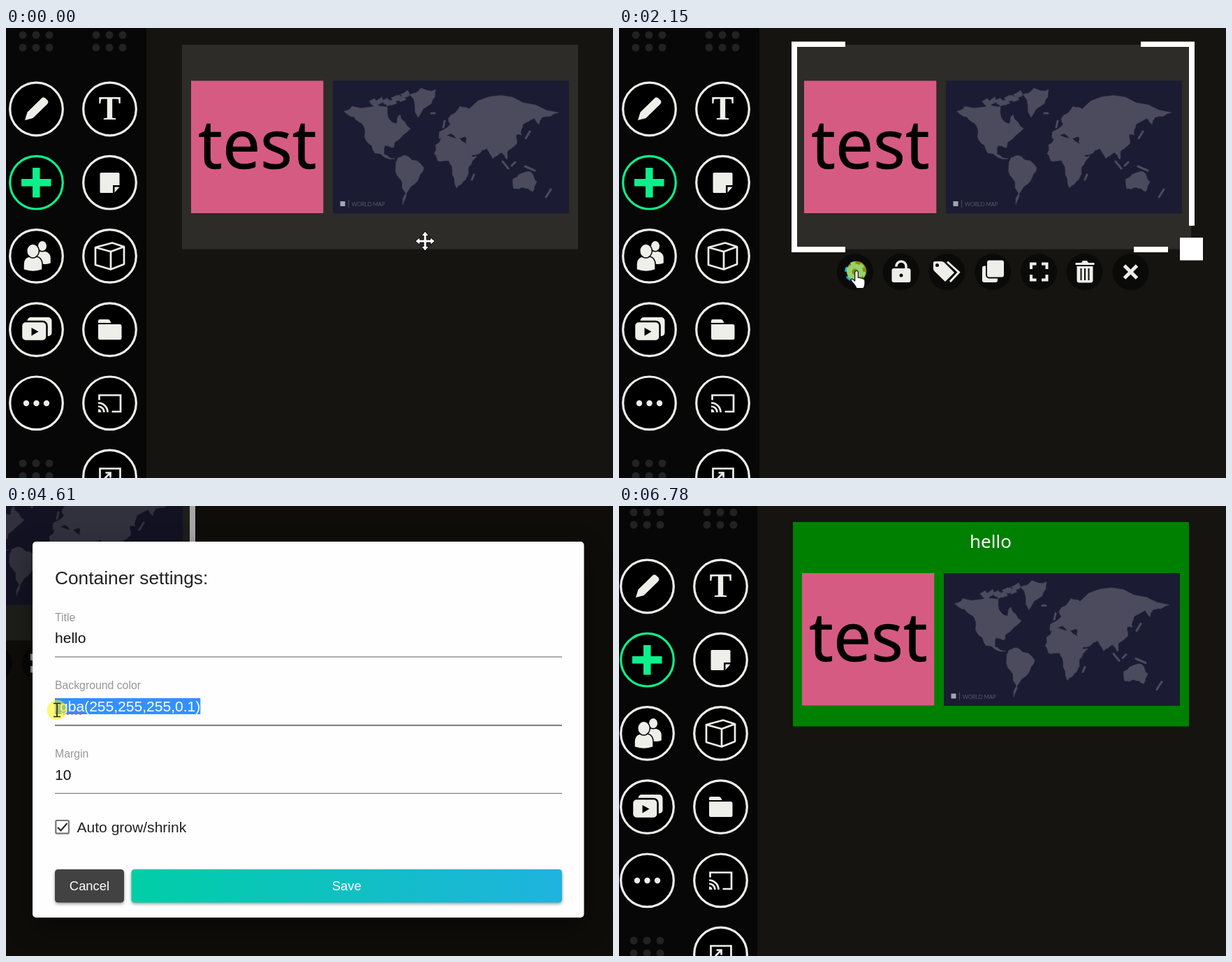
These frames come from a looping animation (869x644 px, 7.9 s). An HTML page:

```html
<!DOCTYPE html>
<html lang="en">
<head>
<meta charset="utf-8">
<title>Container settings</title>
<style>
  html, body { margin: 0; width: 100%; height: 100%; overflow: hidden; background: #151410; }
  svg { display: block; width: 100%; height: 100%; }
  .ring { fill: #000; stroke: #efefea; stroke-width: 3.2; }
  .ring.on { stroke: #0cf08b; }
  .dot { fill: #222; }
  .line { fill: none; stroke: #efefea; stroke-width: 2.7; }
  #icons { fill: #efefea; }
  #tools g { color: #efefea; fill: currentColor; }
  #tools g.hot { color: #10aef2; }
  #tools .disc, #tools .hole { fill: #0a0a09; }
  #tools .stroke { fill: none; stroke: currentColor; }
  #map { fill: #4b4b5d; stroke: #4b4b5d; stroke-linejoin: round; stroke-linecap: round; }
  #dialog text { font-family: "Liberation Sans", Arial, sans-serif; }
  .paper { fill: #fefefe; filter: drop-shadow(0 14px 18px rgba(0,0,0,.4)); }
  .field { font-size: 21.05px; fill: #111; }
  .label { font-size: 15.8px; fill: #979797; }
  .rule { fill: #838383; }
  .button { filter: drop-shadow(0 2px 2px rgba(0,0,0,.4)); }
  .caption { font-size: 18.42px; fill: #fff; text-anchor: middle; }
  #hint rect { fill: #292a2d; filter: drop-shadow(0 2px 3px rgba(0,0,0,.4)); }
  #dialog #hint text { font: 600 14.6px "Open Sans", sans-serif; fill: #f1f1f1; }
  #caret { fill: #777; }
</style>
</head>
<body>
<svg viewBox="0 0 869 644" preserveAspectRatio="none">
  <defs>
    <linearGradient id="teal">
      <stop offset="0" stop-color="#00cea6"/>
      <stop offset="1" stop-color="#1fb3df"/>
    </linearGradient>
  </defs>
  <rect width="869" height="644" fill="#151410"/>

  <g id="world">
    <rect x="-10" y="-10" width="211" height="670" fill="#070707"/>
    <g id="side"></g>
    <g id="icons">
      <path d="M27 132 30.5 120.5 51 100.5Q54 98 57 101L59.5 103.5Q61.5 106 59 109L38.5 129Z"/>
      <text x="148.500" y="131" text-anchor="middle" font-family="Liberation Serif, Times, serif" font-weight="700" font-size="48">T</text>
      <path stroke="#0cf08b" stroke-width="10.5" d="M43.300 200V242.500M22 221.300H64.500"/>
      <path d="M136 207H161Q162.500 207 162.500 208.500V225H153V236H136Q134.500 236 134.500 234.500V208.500Q134.500 207 136 207ZM155.500 235.500V227.500H162.500Z"/>
      <g stroke="#000" stroke-width="1.5">
        <path d="M42 338V328Q42 320 49 319H56Q64.500 321 64.500 329V337Q58 340 50 338Z"/>
        <ellipse cx="52" cy="312" rx="6.800" ry="7.800"/>
        <path d="M25 346V338Q25 329 33 327H44Q52 329 52 338V346Q39 351 25 346Z"/>
        <ellipse cx="38.500" cy="319" rx="8.800" ry="10"/>
      </g>
      <path class="line" stroke-linejoin="round" d="M128 314 152 307.500 169 313V338L150 345.500 128 339ZM128 314 150 320 169 313M150 320V345"/>
      <rect x="30.500" y="414" width="35" height="27" rx="5"/>
      <rect x="22" y="420" width="36.500" height="28" rx="6" stroke="#000" stroke-width="2.5"/>
      <path fill="#000" d="M36.500 429 46.500 434.500 36.500 440.500Z"/>
      <path d="M132 422V419Q132 417 134 417H146Q148 417 149 419L150.500 422ZM132 424H163Q165.500 424 165.500 426.500V443.500Q165.500 446 163 446H134.500Q132 446 132 443.500Z"/>
      <path class="line" d="M133.500 532.500V525.500H164V549H151.500M132 536.500A13.500 13.500 0 0 1 145.500 550M132 541.500A8.500 8.500 0 0 1 140.500 550"/>
      <path d="M132 545.500A4.500 4.500 0 0 1 136.500 550H132Z"/>
      <path class="line" d="M134.500 655V630.500H163.500V655M141 645 149 637M142.500 636.500H149.500V643.500"/>
    </g>

    <rect id="box" x="252" y="24" width="567" height="292.500"/>
    <text id="heading" x="535" y="61" text-anchor="middle" font-family="Noto Sans, sans-serif" font-size="26" fill="#fff"></text>
    <g id="items">
      <rect x="265" y="75.500" width="189.300" height="189.500" fill="#d65b83"/>
      <text x="360" y="201" text-anchor="middle" font-family="Noto Sans, Open Sans, sans-serif" font-size="96" stroke="#000" stroke-width=".6">test</text>
      <rect x="468" y="75.500" width="338" height="190" fill="#1b1c34"/>
      <g id="map">
        <path id="land" stroke-width=".5"/>
        <path id="islands" stroke-width="3" d="M626 142 628 133M744 158 750 148M667 217 670 210M711 191 719 201M724 197 729 192M743 198 757 204M773 242 780 231M609 122H614"/>
      </g>
      <rect x="478.500" y="248" width="7" height="7" fill="#a5a5b0"/>
      <path d="M490.500 246V257" stroke="#4b4b5d"/>
      <text x="495" y="255" font-family="Lato, sans-serif" font-weight="300" font-size="7.800" fill="#85858f">WORLD MAP</text>
    </g>

    <g id="picked">
      <path fill="#fff" d="M247 19.500H324V27H255V313H324V321H247ZM747 19.500H824V283H816V27H747ZM737 313H786V321H737ZM803 300H836V332.500H803Z"/>
      <g id="tools">
        <g id="gear">
          <circle class="stroke" cx="338" cy="349" r="8" stroke-width="7"/>
          <circle class="stroke" cx="338" cy="349" r="12.500" stroke-width="5" stroke-dasharray="6.545"/>
        </g>
        <g id="lock">
          <rect x="390.500" y="344" width="27" height="20" rx="3"/>
          <path class="stroke" stroke-width="3.5" d="M397 341.500V341A7 7 0 0 1 411 341V345"/>
          <circle class="hole" cx="404" cy="354" r="2.500"/>
        </g>
        <g id="tag">
          <path d="M452 334H462Q464 334 465.500 335.500L480 350 467 363 451.500 348Q450 346.500 450 344.500V336Q450 334 452 334Z"/>
          <circle class="hole" cx="455.500" cy="339.500" r="2.500"/>
          <path class="stroke" stroke-width="3" d="M470 334.500 486.500 349.500 474 363"/>
        </g>
        <g id="copy">
          <rect x="520" y="340.500" width="22" height="23.500" rx="3"/>
          <rect x="526" y="331.500" width="26" height="26" rx="4" stroke="#0a0a09" stroke-width="2"/>
        </g>
        <g id="full">
          <path class="stroke" stroke-width="4" d="M590 345V337.500H597.500M605 337.500H612.500V345M612.500 353V360.500H605M597.500 360.500H590V353"/>
        </g>
        <g id="bin">
          <path d="M653.500 336H662L664 333H670L672 336H680.500V339H653.500ZM655.500 341H678.500V361Q678.500 364.500 675 364.500H659Q655.500 364.500 655.500 361Z"/>
          <path stroke="#0a0a09" stroke-width="2" d="M661.500 344V361M667 344V361M672.500 344V361"/>
        </g>
        <g id="close">
          <path class="stroke" stroke-width="5" d="M723.500 340 741.500 358M741.500 340 723.500 358"/>
        </g>
      </g>
    </g>
  </g>

  <g id="dialog">
    <rect width="869" height="644" opacity=".35"/>
    <rect class="paper" x="38" y="51" width="789.500" height="538" rx="5"/>
    <text x="70" y="112" font-size="26.300" fill="#222">Container settings:</text>
    <text id="titleLabel" class="label" x="70">Title</text>
    <text id="title" class="field" x="70" y="196"></text>
    <rect id="titleRule" class="rule" x="70" y="215.300" width="726"/>
    <text class="label" x="70" y="262">Background color</text>
    <rect id="marked" y="275" height="23" fill="#3390ff"/>
    <path id="squiggle" fill="none" stroke="#e0404a"/>
    <text id="color" class="field" x="70" y="293.500"></text>
    <rect id="colorRule" class="rule" x="70" y="312.800" width="726"/>
    <text class="label" x="70" y="360">Margin</text>
    <text class="field" x="70" y="391.500">10</text>
    <rect class="rule" x="70" y="410.700" width="726" height="1.300"/>
    <rect x="71.300" y="450" width="18.600" height="18.600" rx="1.500" fill="none" stroke="#757575" stroke-width="2.200"/>
    <path d="M74 460 78.500 464.500 87.500 454" fill="none" stroke="#222" stroke-width="2"/>
    <text class="field" x="101.500" y="466.500" style="fill:#222">Auto grow/shrink</text>
    <rect class="button" x="70" y="520" width="99" height="47.500" rx="4.500" fill="#424242"/>
    <text class="caption" x="119.500" y="550">Cancel</text>
    <rect class="button" x="179.500" y="520" width="616.500" height="47.500" rx="4.500" fill="url(#teal)"/>
    <text class="caption" x="487.800" y="550">Save</text>
    <rect id="caret" width="1.200" height="22"/>
    <g id="hint">
      <rect x="69" y="201" width="230" height="62" rx="5"/>
      <text x="84" y="238">hello</text>
    </g>
  </g>

  <g id="pointer">
    <circle id="halo" r="14.300" fill="#fff200" opacity=".55"/>
    <path id="move" fill="#fff" stroke="#000" d="M0-14 5.500-7.500H2V-2H7.500V-5.500L14 0 7.500 5.500V2H2V7.500H5.500L0 14-5.500 7.500H-2V2H-7.500V5.500L-14 0-7.500-5.500V-2H-2V-7.500H-5.500Z"/>
    <path id="hand" fill="#fff" stroke="#111" stroke-width="1.2" stroke-linejoin="round" d="M-2.300 2Q-2.300-.5 0-.5T2.300 2V9.500Q4.500 8.500 6 10Q8 9.500 9 11Q12 11 12 14V18Q12 21 10 24.500H0Q-1 21.500-4 18Q-7 15-8 12.500Q-7.500 10-4.500 12L-2.300 14Z"/>
    <path id="beam" fill="none" stroke="#222" stroke-width="1.7" d="M-5-9.500H-1L0-8.500 1-9.500H5M-5 9.500H-1L0 8.500 1 9.500H5M0-8.500V8.500"/>
  </g>
</svg>
<script>
const LOOP = 7900;
const $ = id => document.getElementById(id);
const show = (id, on) => { $(id).style.display = on ? '' : 'none'; };
const set = (id, attrs) => { for (const k in attrs) $(id).setAttribute(k, attrs[k]); };
const disc = (x, y, r, cls) => `<circle class="${cls}" cx="${x}" cy="${y}" r="${r}"/>`;

// Sidebar buttons, grips and the three dots
const trio = (x, y, gap, r, cls) => [-gap, 0, gap].map(d => disc(x + d, y, r, cls)).join('');
const grip = (x, y) => trio(x, y, 19, 5.5, 'dot') + trio(x, y + 18, 19, 5.5, 'dot');
let side = grip(43, 10) + grip(148, 10) + grip(43, 623);
for (let i = 0; i < 6; i++) {
  const y = 116 + 105.2 * i;
  if (i < 5) side += disc(43.5, y, 37.8, i === 1 ? 'ring on' : 'ring');
  side += disc(148.5, y, 37.8, 'ring');
}
$('side').innerHTML = side;
$('icons').insertAdjacentHTML('beforeend', trio(43.5, 537, 14.5, 4.2, ''));
[...$('tools').children].forEach((g, i) =>
  g.insertAdjacentHTML('afterbegin', disc(338 + 65.75 * i, 349, 26, 'disc')));
set('squiggle', { d: 'M78 297.5q1.5-3 3 0' + 't3 0'.repeat(10) });

// Rough coastlines: a few corners per landmass, broken up by midpoint displacement
let seed = 11;
const random = () => (seed = seed * 16807 % 2147483647) / 2147483647;
function roughen(points) {
  return points.flatMap(([x, y], i) => {
    const [u, v] = points[(i + 1) % points.length];
    const k = (random() - 0.5) * 0.3;
    return [[x, y], [(x + u) / 2 + k * (v - y), (y + v) / 2 - k * (u - x)]];
  });
}
function coast(corners) {
  const points = corners.split(' ').map(p => p.split(',').map(Number));
  return 'M' + roughen(roughen(points)).map(p => p.map(n => n.toFixed(1))).join('L') + 'Z';
}
const northAmerica = '484,119 495,112 546,113 547,128 559,137 564,124 579,144 557,163 555,171 543,168 541,181 557,187 528,179 515,160 512,140 498,127';
const southAmerica = '561,186 576,184 598,200 589,219 573,237 568,253 567,220 558,199';
const greenland = '578,95 594,86 615,88 609,108 590,128';
const africa = '623,158 637,156 658,165 667,184 674,184 662,199 658,217 645,229 639,203 634,190 618,190 613,180';
const eurasia = '620,158 620,149 636,138 633,130 650,112 663,116 725,99 791,121 767,128 763,138 756,129 740,138 738,153 731,152 731,166 719,175 717,188 710,178 697,187 688,172 677,180 667,182 659,164 659,156 645,158 638,151';
const australia = '726,216 744,206 751,206 760,220 754,234 740,228 727,230';
let land = [northAmerica, southAmerica, greenland, africa, eurasia, australia].map(coast).join('');
for (let i = 0; i < 12; i++) {
  const x = 520 + 4.5 * i, y = 108 - i + 8 * (random() - 0.5), w = 4 + 5 * random();
  land += `M${x} ${y}l${w}-4 ${w / 2} 6-${w} 3Z`;
}
set('land', { d: land });

// Each step keeps what the ones before it set
const steps = [
  [0, { view: 'board', picked: 0, hot: '', ptr: 'move', x: 600, y: 305, click: 0, focus: '', from: 1 }],
  [340, { picked: 1, click: 1 }],
  [570, { click: 0, x: 680, y: 318 }],
  [810, { ptr: 'hand', x: 733, y: 348, hot: 'close' }],
  [1150, { x: 655, hot: 'bin' }],
  [1390, { x: 543, hot: 'copy' }],
  [1630, { x: 420, hot: 'lock' }],
  [1810, { x: 340, hot: 'gear' }],
  [2150, { click: 1 }],
  [2390, { view: 'dialog', ptr: '', click: 0, hot: '' }],
  [2830, { ptr: 'beam', x: 190, y: 386 }],
  [3000, { x: 159, y: 191 }],
  [3170, { focus: 'title' }],
  [4070, { x: 270, y: 288 }],
  [4250, { focus: 'color', x: 279, y: 290, click: 1 }],
  [4430, { x: 170, y: 291, from: 0.48 }],
  [4610, { x: 73, y: 292, from: 0 }],
  [4810, { click: 0 }],
  [5000, { from: 1 }],
  [5200, { ptr: '' }],
  [5980, { ptr: 'hand', x: 218, y: 441 }],
  [6130, { x: 331, y: 544 }],
  [6630, { click: 1 }],
  [6780, { view: 'done', picked: 0, ptr: '', click: 0, focus: '' }]
];
const shifts = { board: '0 0', dialog: '-553 -124', done: '-3 -1' };
const typed = (word, since, pace, t) => t < since ? '' : word.slice(0, 1 + (t - since) / pace);

function draw(s, t) {
  const done = s.view === 'done';
  const title = typed('hello', 3340, 137, t);
  set('world', { transform: `translate(${shifts[s.view]})` });
  set('box', { fill: done ? 'green' : '#2d2c28' });
  set('items', { transform: `translate(0 ${done ? 21.5 : 0})` });
  $('heading').textContent = done ? title : '';
  show('picked', s.picked);
  for (const g of $('tools').children) g.classList.toggle('hot', g.id === s.hot);

  show('dialog', s.view === 'dialog');
  $('title').textContent = title;
  $('color').textContent = typed('green', 5000, 200, t) || 'rgba(255,255,255,0.1)';
  const raised = title || s.focus === 'title';
  set('titleLabel', { y: raised ? 164.5 : 196 });
  $('titleLabel').style.fontSize = raised ? '' : '21.05px';
  for (const f of ['title', 'color']) set(f + 'Rule', { height: s.focus === f ? 2.2 : 1.3 });
  show('hint', title && title !== 'hello');

  const marking = s.from < 1;
  show('marked', marking);
  show('squiggle', marking);
  show('caret', s.focus && !marking);
  $('color').style.fill = s.from === 0 ? '#fff' : '';
  if (s.focus) {
    const width = $(s.focus).getComputedTextLength();
    set('marked', { x: 70 + s.from * width, width: (1 - s.from) * width });
    set('caret', { x: 70 + width, y: s.focus === 'title' ? 178 : 275.5 });
  }

  set('pointer', { transform: `translate(${s.x} ${s.y})` });
  for (const p of ['move', 'hand', 'beam']) show(p, p === s.ptr);
  show('halo', s.click);
}

let start;
function tick(now) {
  start ??= now;
  const t = (now - start) % LOOP;
  draw(Object.assign({}, ...steps.filter(([at]) => at <= t).map(step => step[1])), t);
  requestAnimationFrame(tick);
}
draw(steps[0][1], 0);
requestAnimationFrame(tick);
</script>
</body>
</html>
```
